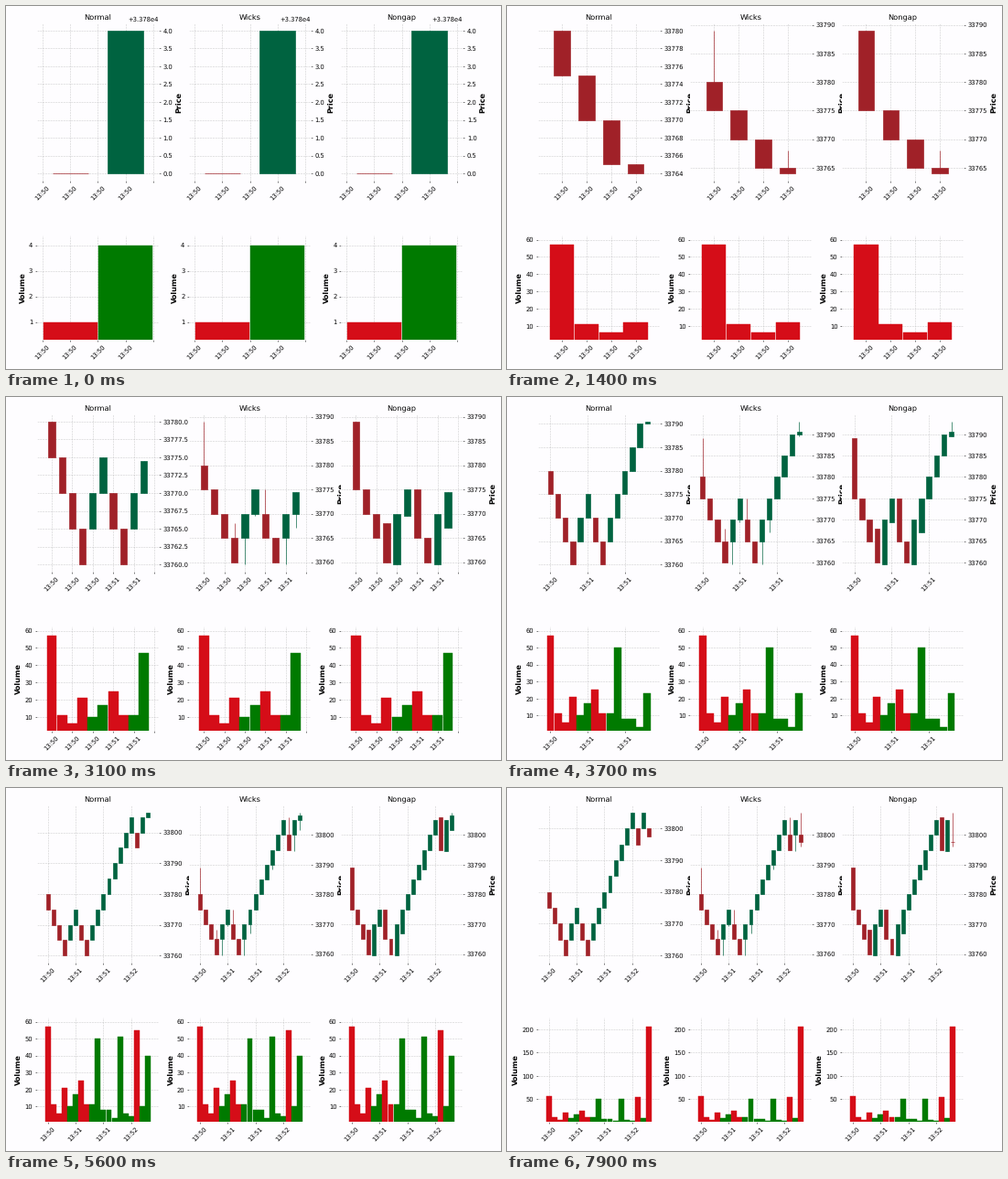
These frames come from a looping animation (541x397 px, 8000 ms). A matplotlib script:

```python
import matplotlib.pyplot as plt
import numpy as np
from matplotlib.animation import FuncAnimation
from matplotlib.collections import LineCollection, PolyCollection

W, H, DPI = 541, 397, 48
FRAMES, INTERVAL = 80, 100
BASE, START, BRICK = 33700, 80, 5
BG = "#fefdff"
CANDLE = {True: "#006340", False: "#a02128"}
VOLUME = {True: "#007a00", False: "#d50d18"}
MODES = ("Normal", "Wicks", "Nongap")

# Runs of falling and rising bricks; the last brick stays open
SIGNS = np.repeat([-1, 1, -1, 1, -1, 1], [4, 2, 2, 8, 1, 1])
SIZES = [57, 11, 6, 21, 10, 17, 25, 11, 11, 50, 8, 8, 3, 51, 6, 4, 55, 10, 206]
# Turning points of the price inside a brick
TURNS = {
    0: [83.5, 89, 84],
    3: [68],
    4: [59.5],
    5: [69.5],
    7: [64] * 4,
    8: [59.5],
    9: [67],
    13: [89.5, 93, 91.5, 88.5],
    16: [106],
    17: [94.5],
    18: [101.5, 107.5] + [106.5] * 5 + [96, 97.5],
}

plt.rcParams.update({
    "font.family": "DejaVu Sans",
    "font.size": 10.2,
    "text.hinting": "none",
    "axes.titlesize": 12.3,
    "axes.labelsize": 12.2,
    "axes.labelweight": "bold",
    "axes.edgecolor": BG,
    "axes.facecolor": BG,
    "axes.axisbelow": True,
    "axes.grid": True,
    "grid.color": "#b0b0b0",
    "grid.alpha": 0.65,
    "grid.linestyle": "--",
    "grid.linewidth": 0.8,
})


def make_paths():
    """Price path of every brick; turning round costs two bricks."""
    paths, price, last = [], START, SIGNS[0]
    for k in range(len(SIZES)):
        path = [price] + TURNS.get(k, [])
        if k < len(SIGNS):
            sign = SIGNS[k]
            price += sign * BRICK * (1 if sign == last else 2)
            path.append(price)
            last = sign
        paths.append(path)
    return paths


PATHS = make_paths()


def total_volume(i):
    return round(float(np.interp(i, [0, 7, 23, 56, 67, 79],
                                 [4, 32, 156, 404, 482, 570])))


def walk(path, done):
    """Close, low and high so far; the price moves fast at first."""
    pos = np.sqrt(done) * (len(path) - 1)
    close = round(2 * float(np.interp(pos, range(len(path)), path))) / 2
    seen = path[:int(pos) + 1] + [close]
    return close, min(seen), max(seen)


def closed_bar(mode, path):
    c, lo, hi = path[-1], min(path), max(path)
    up = c > path[0]
    o = c - BRICK if up else c + BRICK
    if mode == "Normal":
        lo, hi = min(o, c), max(o, c)
    elif mode == "Nongap":
        o = lo if up else hi
    return o, c, lo, hi


def open_bar(mode, c, lo, hi, prev):
    po, pc = prev or (START, START)
    bottom, top = min(po, pc), max(po, pc)
    o = c if bottom <= c <= top else min(max(c, bottom), top)
    if mode == "Normal" and prev:
        lo, hi = min(o, c), max(o, c)
    elif mode == "Nongap":
        if c > top:
            o = lo
        elif pc > po:
            o = c
    return o, c, lo, hi


def chart(mode, total):
    """Bars (open, close, low, high) and their volumes."""
    k, v = 0, total
    while k < len(SIGNS) and v > SIZES[k]:
        v -= SIZES[k]
        k += 1
    if k:
        bars, vols = [closed_bar(mode, p) for p in PATHS[:k]], SIZES[:k]
        prev = closed_bar("Normal", PATHS[k - 1])[:2]
    else:
        bars, vols, prev = [(START,) * 4], [1], None
    bars.append(open_bar(mode, *walk(PATHS[k], v / SIZES[k]), prev))
    return np.array(bars, float), vols + [v]


def rects(width, bottoms, tops):
    h = width / 2
    return [[(x - h, a), (x - h, b), (x + h, b), (x + h, a)]
            for x, (a, b) in enumerate(zip(bottoms, tops))]


class Panel:
    def __init__(self, col, mode):
        self.mode, self.count = mode, 2
        left = 33.9 + 166.15 * col
        self.price = self.add_axes(left, 19, 191)
        self.price.set_title(mode)
        self.price.yaxis.tick_right()
        self.price.yaxis.set_label_position("right")
        self.price.set_ylabel("Price")
        self.volume = self.add_axes(left, 250.5, 365.2)
        self.volume.set_ylabel("Volume")
        self.wicks = LineCollection([], linewidths=1)
        self.bodies = PolyCollection([], linewidths=1)
        self.columns = PolyCollection([], linewidths=0.65)
        self.price.add_collection(self.wicks, autolim=False)
        self.price.add_collection(self.bodies, autolim=False)
        self.volume.add_collection(self.columns, autolim=False)

    def add_axes(self, left, top, bottom):
        ax = fig.add_axes([left / W, 1 - bottom / H,
                           132.9 / W, (bottom - top) / H])
        ax.xaxis.set_major_formatter(self.clock)
        ax.tick_params(axis="x", rotation=45)
        return ax

    def clock(self, x, pos=None):
        k = int(round(x))
        if not 0 <= k < self.count:
            return ""
        return f"13:{50 + (k >= 5) + (k >= 14)}"

    def update(self, total):
        bars, vols = chart(self.mode, total)
        o, c, lo, hi = (bars + BASE).T
        n = self.count = len(vols)
        ups = (c > o).tolist()

        self.wicks.set_segments([[(x, a), (x, b)]
                                 for x, (a, b) in enumerate(zip(lo, hi))])
        self.wicks.set_color([CANDLE[u] for u in ups])
        self.bodies.set_verts(rects(0.65, np.minimum(o, c), np.maximum(o, c)))
        self.bodies.set_color([CANDLE[u] for u in ups])
        self.columns.set_verts(rects(0.98, [0] * n, vols))
        self.columns.set_color([VOLUME[u] for u in ups])

        gap = (n - 1) / n
        pad = gap + 0.05 * (n - 1 + 2 * gap)
        for ax in (self.price, self.volume):
            ax.set_xlim(-pad, n - 1 + pad)
        margin = 0.05 * (hi.max() - lo.min())
        self.price.set_ylim(lo.min() - margin, hi.max() + margin)
        self.volume.set_ylim(0.3 * min(vols), 1.1 * max(vols))


fig = plt.figure(figsize=(W / DPI, H / DPI), dpi=DPI, facecolor=BG)
panels = [Panel(col, mode) for col, mode in enumerate(MODES)]


def draw(i):
    total = total_volume(i)
    for panel in panels:
        panel.update(total)
    return []


anim = FuncAnimation(fig, draw, frames=FRAMES, interval=INTERVAL,
                     repeat=True, repeat_delay=0, blit=False)
plt.show()
```
